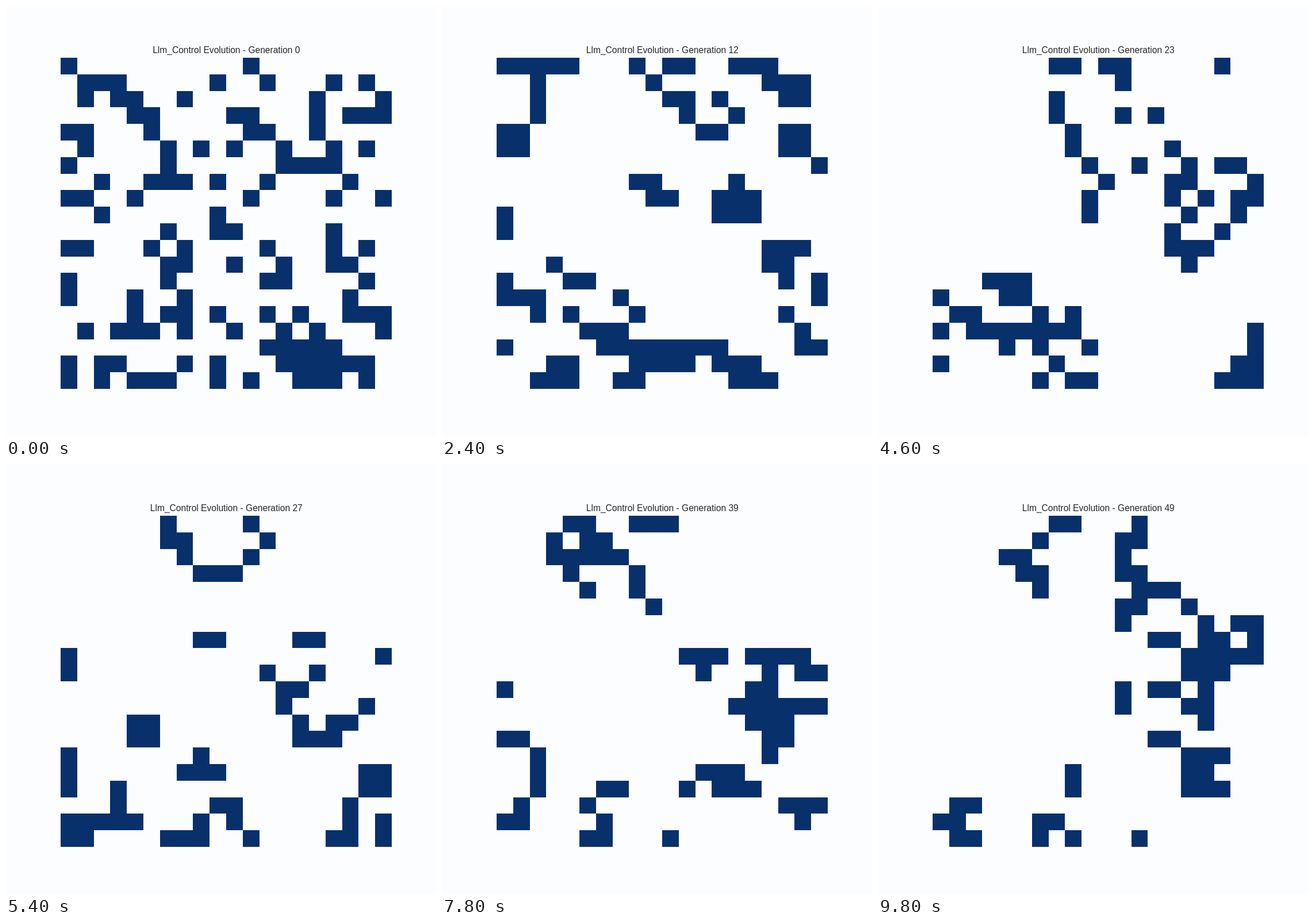
Animation, 748 px wide and 748 px high, one loop 10 s. Source, as an HTML page:

```html
<!DOCTYPE html>
<html lang="en">
<head>
<meta charset="utf-8">
<title>Life on a torus</title>
<style>
  html, body { margin: 0; width: 100%; height: 100%; overflow: hidden; background: #fcfdff; }
  svg { display: block; width: 100vw; height: 100vh; }
  text { font: 15.58px "Liberation Sans", Arial, sans-serif; fill: #262626; text-anchor: middle; }
  path { fill: #08306b; shape-rendering: crispEdges; }
</style>
</head>
<body>
<svg viewBox="0 0 748 748">
  <text id="title" x="383.3" y="82"></text>
  <path id="cells"/>
</svg>
<script>
const SIZE = 20, GENERATIONS = 50, STEP = 200;
const SEED = `
#..........#........
.###.....#..#...#.#.
.#.##..#.......#...#
....##....##...#.###
##...#.....##..#....
.#....#.#.#..#..#.#.
#.....#......####...
..#..###.#..#....#..
##..#......#....#..#
..#......#..........
......#..##.....#...
##...#.#....#...#.#.
......##..#..#..##..
#.....#.....##....#.
#...#..#.........#..
....#.##.#..#.#..###
.#.###.#..#..#.#...#
............#####...
#.##...#.#...######.
#.#.###..#.#..###.#.`;

const wrap = i => (i + SIZE) % SIZE;

// Conway's rules (B3/S23), edges joined
function evolve(grid) {
  return grid.map((row, y) => row.map((alive, x) => {
    let sum = 0;
    for (let dy = -1; dy <= 1; dy++)
      for (let dx = -1; dx <= 1; dx++)
        sum += grid[wrap(y + dy)][wrap(x + dx)];
    return +(sum === 3 || (alive && sum === 4));
  }));
}

// Cell edges sit on whole pixels
const edgeX = i => Math.floor(95.45 + 28.8 * i);
const edgeY = i => Math.floor(90.45 + 28.8 * i);

function outline(grid) {
  let d = "";
  grid.forEach((row, y) => row.forEach((alive, x) => {
    if (alive) d += `M${edgeX(x)} ${edgeY(y)}H${edgeX(x + 1)}V${edgeY(y + 1)}H${edgeX(x)}Z`;
  }));
  return d;
}

const shapes = [];
let grid = SEED.trim().split("\n").map(row => [...row].map(c => +(c === "#")));
for (let i = 0; i < GENERATIONS; i++) {
  shapes.push(outline(grid));
  grid = evolve(grid);
}

const title = document.getElementById("title");
const cells = document.getElementById("cells");
let shown = -1;

function show(generation) {
  if (generation === shown) return;
  shown = generation;
  title.textContent = `Llm_Control Evolution - Generation ${generation}`;
  cells.setAttribute("d", shapes[generation]);
}

const start = performance.now();
function tick() {
  show(Math.floor((performance.now() - start) / STEP) % GENERATIONS);
  requestAnimationFrame(tick);
}
show(0);
requestAnimationFrame(tick);
</script>
</body>
</html>
```
